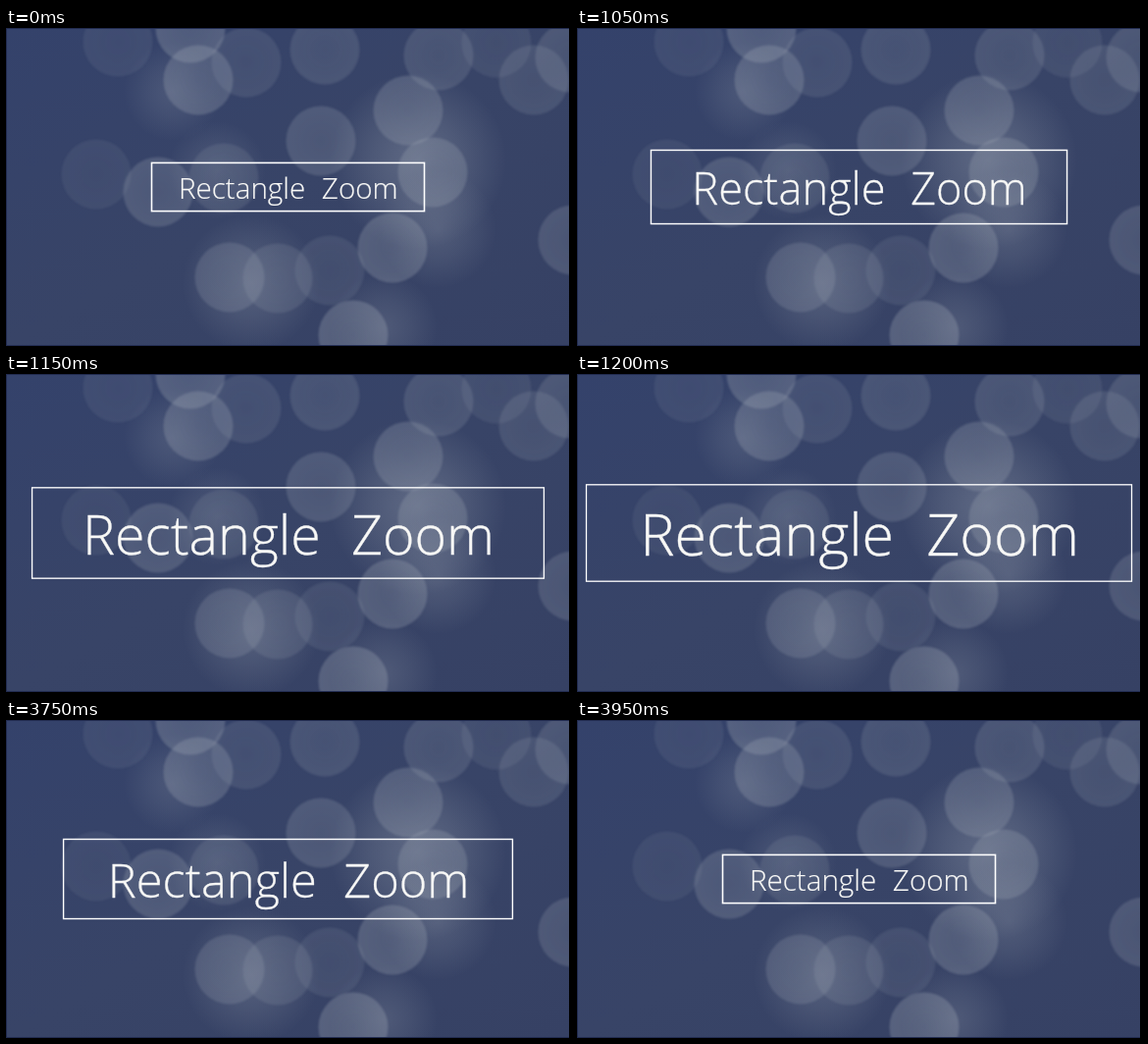
An HTML page for the animation above (5000 ms loop, 576 by 324 pixels).

```html
<!DOCTYPE html>
<html lang="en">
<head>
<meta charset="utf-8">
<title>Rectangle Zoom</title>
<style>
html, body { margin: 0; width: 100%; height: 100%; overflow: hidden; background: #374368; }
svg { display: block; width: 100vw; height: 100vh; }
text { font: 300 29.6px "Open Sans", "Noto Sans", sans-serif; text-anchor: middle; }
</style>
</head>
<body>
<svg viewBox="0 0 576 324">
  <defs>
    <linearGradient id="base" x1="0" y1="0" x2="1" y2="1">
      <stop offset="0" stop-color="#34426b"/>
      <stop offset=".5" stop-color="#384467"/>
      <stop offset="1" stop-color="#364164"/>
    </linearGradient>
    <radialGradient id="haze">
      <stop offset="0" stop-color="#a6aeba"/>
      <stop offset=".5" stop-color="#a6aeba" stop-opacity=".55"/>
      <stop offset="1" stop-color="#a6aeba" stop-opacity="0"/>
    </radialGradient>
    <radialGradient id="disc">
      <stop offset="0" stop-color="#a6aeba" stop-opacity=".8"/>
      <stop offset="1" stop-color="#a6aeba"/>
    </radialGradient>
    <filter id="soft"><feGaussianBlur stdDeviation="1"/></filter>
  </defs>
  <rect width="576" height="324" fill="url(#base)"/>
  <g id="glows" fill="url(#haze)"></g>
  <g id="bokeh" fill="url(#disc)" filter="url(#soft)"></g>
  <path d="M0 .5H576M.5 0V324M0 323.5H576" fill="none" stroke="#232d52"/>
  <rect x="574" width="2" height="324"/>
  <rect id="box" fill="none" stroke="#fff"/>
  <g id="label" fill="#f8f8f6" stroke="#f8f8f6" stroke-width=".2">
    <text x="-46.9" y="11.6">Rectangle</text>
    <text x="73.3" y="11.6">Zoom</text>
  </g>
</svg>
<script>
const $ = id => document.getElementById(id);

function set(el, attrs) {
  for (const k in attrs) el.setAttribute(k, attrs[k]);
}

function addCircle(parent, cx, cy, r, opacity) {
  const el = document.createElementNS("http://www.w3.org/2000/svg", "circle");
  set(el, { cx, cy, r, opacity });
  parent.appendChild(el);
}

// Wide lights: the larger, the brighter
const glows = [[420, 135, 90], [385, 305, 55], [170, 65, 50], [250, 260, 70], [440, 205, 60], [215, 145, 50]];
glows.forEach(([x, y, r]) => addCircle($("glows"), x, y, r, r / 250));

// Disc centres, brightest first
const discs = [
  [354, 313], [188, 0], [394, 224], [196, 53], [435, 147], [410, 84], [155, 167],
  [321, 115], [578, 216], [228, 254], [575, 30], [441, 28], [325, 22], [538, 53],
  [277, 255], [245, 35], [222, 153], [330, 247], [500, 15], [114, 14], [92, 149]
];
discs.forEach(([x, y], i) => addCircle($("bokeh"), x, y, 35.5, 0.3 - i * 0.01));

const LOOP = 5000, STEP = 50;

// Share of a move still to go before it ends
const left = (t, end, span) => Math.max(0, (end - t) / span) ** 1.23;

function zoomAt(t) {
  if (t < 1000) return 0;
  return t < 3700 ? 1 - left(t, 1200, 275) : left(t, 3950, 285);
}

function draw(t) {
  const p = zoomAt(Math.floor(t / STEP) * STEP), s = 1 + p;
  const w = 278 * s, h = 49.2 * s;
  set($("box"), {
    x: 287.5 - w / 2, y: 162 - h / 2, width: w, height: h, "stroke-width": 1.6 - 0.3 * p
  });
  set($("label"), { transform: `translate(287.5 162) scale(${s})` });
  $("label").style.filter = p ? "blur(.3px)" : "none";
}

function tick() {
  draw(performance.now() % LOOP);
  requestAnimationFrame(tick);
}
tick();
</script>
</body>
</html>
```
